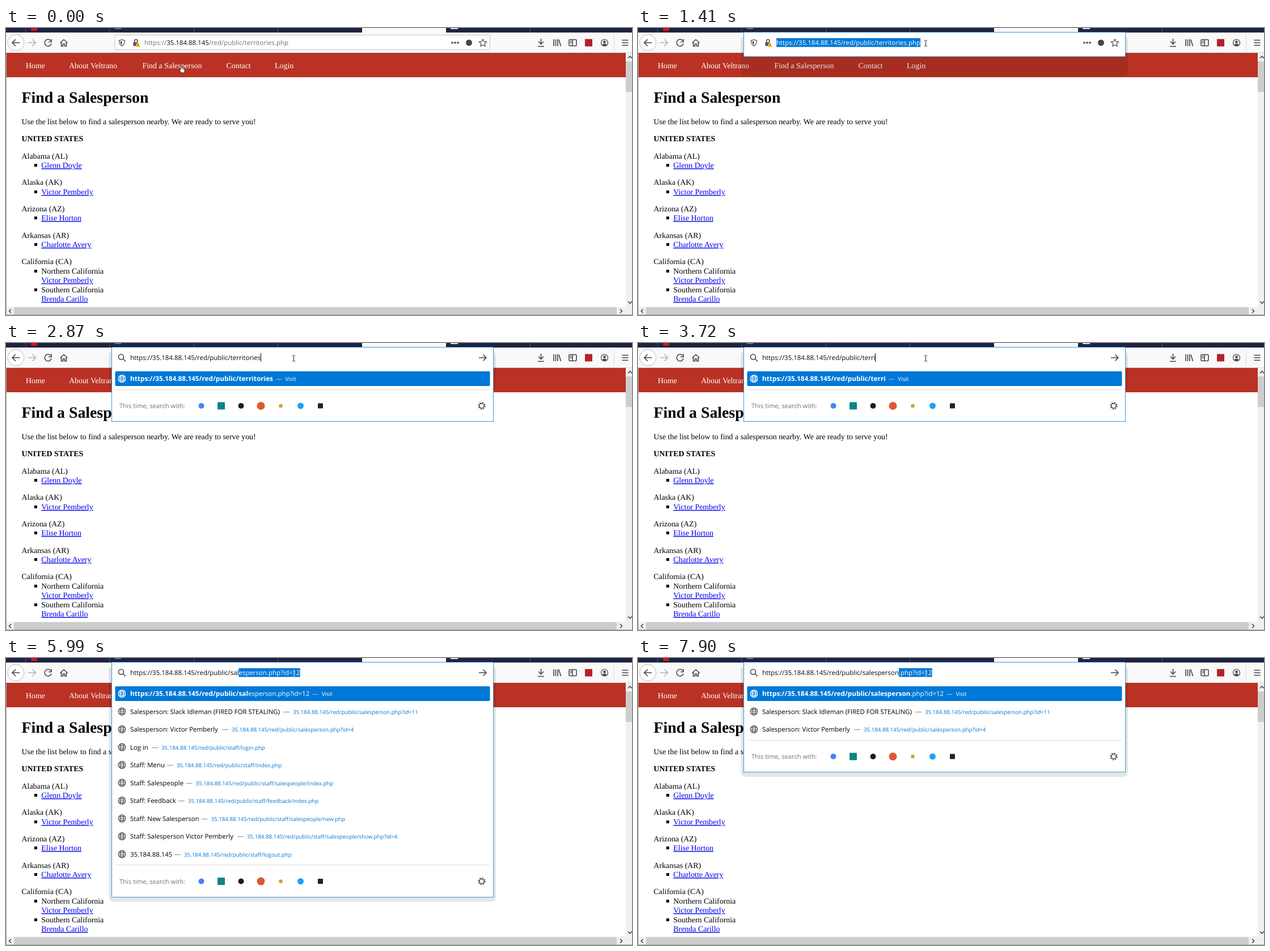
Write an HTML page that moves like this. It is 1104 by 507 pixels and loops after 8000 ms.

```html
<!DOCTYPE html>
<html lang="en">
<head>
<meta charset="utf-8">
<title>Find a Salesperson</title>
<style>
  html, body { margin: 0; width: 100%; height: 100%; overflow: hidden; background: #fff; }
  svg { display: block; width: 100%; height: 100%; }
  text { white-space: pre; text-rendering: geometricPrecision; }
  .page { font: 13.9px "Liberation Serif", serif; }
  .ui { font: 11.47px "Open Sans", sans-serif; }
  .title { font-size: 11.4px; }
  .hint { font-size: 11.2px; fill: #737377; }
  .url { font-size: 9.72px; fill: #0a78d4; }
  .bold { font-weight: 700; font-size: 11.78px; }
  .link { fill: #00e; text-decoration: underline; }
  .icon { fill: none; stroke: #45454a; stroke-width: 1.6; }
  .thin { stroke-width: 1.2; }
</style>
</head>
<body>
<svg viewBox="0 0 1104 507">
  <defs>
    <linearGradient id="fade"><stop stop-color="#fff" stop-opacity="0"/><stop offset="1" stop-color="#fff"/></linearGradient>
    <g id="globe" fill="none" stroke-width="1.2">
      <circle r="6.3"/><ellipse rx="2.8" ry="6.3"/><path d="M-6.3 0H6.3M-5.4-3.2H5.4M-5.4 3.2H5.4"/>
    </g>
    <g id="site">
      <path class="icon thin" d="M204.5 20.5c2 1 3.5 1.3 5 1.3 0 5-1 8-5 10-4-2-5-5-5-10 1.5 0 3-.3 5-1.3z"/>
      <path fill="#45454a" d="M204.5 23v6.500c-2-1.300-2.600-3-2.700-5.800z"/>
      <path class="icon" d="M226.500 25v-2a2.700 2.700 0 0 1 5.400 0v2"/>
      <rect x="224.500" y="25" width="9" height="7" rx="1" fill="#55555a"/>
      <path d="M232.500 25l5 8.500h-10z" fill="#ffbf00" stroke="#fff" stroke-width=".6"/>
      <path d="M232.500 28v2.500m0 .8v1" stroke="#5a4300"/>
      <g fill="#45454a"><circle cx="787" cy="26" r="1.800"/><circle cx="792" cy="26" r="1.800"/><circle cx="797" cy="26" r="1.800"/>
        <circle cx="816.500" cy="26" r="5.500"/></g>
      <path class="icon thin" stroke-linejoin="round" d="M841 19.500l2 4.400 4.800.5-3.600 3.200 1 4.700-4.200-2.400-4.200 2.400 1-4.700-3.600-3.200 4.800-.5z"/>
    </g>
    <path id="hand" fill="#fff" stroke="#222" stroke-width=".9" stroke-linejoin="round"
      d="M-2.500 1.500V-4.500q1-1.500 2 0V-1q3-.3 5 1.500V4L3.500 6.500H-1.500L-4.500 2.500q0-1.500 2-1z"/>
    <path id="arrow" fill="#fff" stroke="#222" stroke-width=".9" d="M-3-6V5l2.500-2.300L1 6l1.700-.8L1.200 2H4.500z"/>
    <path id="beam" fill="none" stroke-width="1" d="M-2.500-5h2m1 0h2M0-4.500V4.500M-2.500 5h2m1 0h2"/>
  </defs>

  <rect width="1104" height="507" fill="#fff"/>
  <!-- tab strip and toolbar -->
  <rect width="1104" height="8" fill="#1f2342"/>
  <path d="M34.500 0v8M182.500 0v8M331.500 0v8M479.500 0v8M924.500 0v8" stroke="#4a4e69"/>
  <rect x="44" width="11" height="5" rx="2" fill="#e0101a"/>
  <rect x="192" width="11" height="2" fill="#60758c"/>
  <rect x="784" width="13" height="2" fill="#ddd"/>
  <rect y="8" width="1104" height="35" fill="#f9f9fa"/>
  <rect x="628" width="148" height="9" fill="#f9f9fa"/>
  <path d="M0 43.500H1104" stroke="#d8d8da"/>
  <circle cx="17.500" cy="26" r="14.500" fill="#fff" stroke="#b8b8bc"/>
  <g class="icon">
    <path d="M24.500 26H11m6-6l-6 6 6 6"/>
    <path d="M39 26h13.500m-6-6l6 6-6 6" stroke="#b4b4b8"/>
    <path d="M79 22.500a6 6 0 1 0 1 5M80 19.500v5h-5"/>
    <path d="M95.500 26.500l6.500-6 6.500 6M97.500 25.500V32h3v-4h3v4h3v-6.500"/>
    <path d="M943.500 19v9.500m-4.500-4.500l4.500 4.500L948 24M938 32.500h11"/>
    <path d="M966 20v12M969.500 20v12M973 20v12M975 20.500l3.500 11.500"/>
    <rect x="993" y="20.500" width="13" height="11" rx="1.500"/><path d="M999 20.500v11M995 23.500h2.500M995 26h2.500"/>
    <circle cx="1055.500" cy="26" r="6" class="thin"/>
    <path d="M1086.500 21.500h11M1086.500 26h11M1086.500 30.500h11"/>
  </g>
  <g fill="#45454a"><circle cx="1055.500" cy="24.500" r="2.300"/><path d="M1051.500 29.500q4-4 8 0-4 4-8 0z"/></g>
  <rect x="1021" y="19.500" width="13" height="13" fill="#b5202b"/>
  <path d="M1072.500 12v28" stroke="#dcdce0"/>
  <rect x="192" y="12.500" width="661.500" height="26" rx="2" fill="#fff" stroke="#c4c4c8"/>
  <use href="#site"/>
  <text class="ui" x="244" y="30" fill="#737377">https://<tspan fill="#0c0c0d">35.184.88.145</tspan>/red/public/territories.php</text>

  <!-- page -->
  <rect x="1" y="44" width="1092" height="43" fill="#ba3224"/>
  <g class="page" id="page">
    <text x="27.500" y="132" font-size="27.800" font-weight="700">Find a Salesperson</text>
    <text x="27.500" y="170">Use the list below to find a salesperson nearby. We are ready to serve you!</text>
    <text x="27.500" y="200" font-weight="700">UNITED STATES</text>
  </g>
  <!-- scroll bars -->
  <path fill="#f0f0f0" d="M1093 44h11v463H0V492.500h1093z"/>
  <path fill="#cdcdcd" d="M1093 59h11v54h-11zM14 493h1063v13H14z"/>
  <path class="icon" d="M1097 53.500l3.500-3.500 3.500 3.500M1097 483l3.500 3.500 3.500-3.500M9 496.500L5.500 500 9 503.500M1083 496.500l3.500 3.500-3.500 3.500"/>
  <path fill="none" stroke="#a9a9a9" d="M.5 44V506.500H1104"/>

  <g class="ui" id="panel"></g>
  <use id="cursor" href="#hand"/>
</svg>

<script>
const $ = id => document.getElementById(id);
const text = (x, y, str, attrs = '') => `<text x="${x}" y="${Math.round(y)}" ${attrs}>${str}</text>`;
const rect = (x, y, w, h, fill, r = 0) =>
  `<rect x="${x}" y="${y}" width="${w}" height="${h}" rx="${r}" fill="${fill}"/>`;
const dot = (x, y, fill, r = 6) => `<circle cx="${x}" cy="${y}" r="${r}" fill="${fill}"/>`;
const square = (x, y, fill, s = 13) => rect(x - s / 2, y - s / 2, s, s, fill, 1);

// ---- page text ----
const nav = [[35, 'Home'], [111, 'About Veltrano'], [240.5, 'Find a Salesperson'], [388.5, 'Contact'], [474, 'Login']];
const states = [
  ['Alabama (AL)', '*Glenn Doyle'], ['Alaska (AK)', '*Victor Pemberly'],
  ['Arizona (AZ)', '*Elise Horton'], ['Arkansas (AR)', '*Charlotte Avery'],
  ['California (CA)', 'Northern California', '*Victor Pemberly', 'Southern California', '*Brenda Carillo']
];
let page = nav.map(([x, label]) => text(x, 71, label, 'fill="#fff"')).join('');
states.forEach(([name, ...lines], i) => {
  const top = 230.5 + 46.7 * i;
  page += text(27.5, top, name);
  lines.forEach((line, j) => {
    const y = top + 16.4 * (j + 1), link = line[0] === '*';
    page += text(62.3, y, line.replace('*', ''), link ? 'class="link"' : '');
    if (j % 2 === 0) page += rect(50, Math.round(y) - 7, 5, 5, '#000');
  });
});
$('page').insertAdjacentHTML('beforeend', page);

// ---- suggestion rows: title, x of address, address, icon ----
const host = '35.184.88.145/red/public/';
const base = 'https://' + host;
const topSites = [
  ['Search with Velmora.com', 0, '', dot, '#1c1c1c'],
  ['Pagehood - Log In or Sign Up', 396, 'pagehood.com', square, '#3b5998'],
  ['Vidoona', 287, 'vidoona.com', square, '#f00'],
  ['lmportal.elmu', 319.5, 'lmportal.elmu.edu', square, '#111'],
  ['ENGR 276 Grades-Spring 2020 - Mondra Sheets', 492, 'docs.google.com/spreadsheets/d/17kD44Y7eTRA8FcB7aomfpLC3wBRbPk6Qwg', square, '#0f9d58'],
  ['Inbox - marisolandri.westdoe@letteo.com - Letteo', 507.5, 'mail.google.com/mail/u/0/#inbox', square, '#d54b3d'],
  ['Jobgrove: Log In or Sign Up', 385, 'jobgrove.com', square, '#0a70b0'],
  ['Lab: Unit 1 - Infodefense Institution | Trailbound Courses', 543, 'courses.codepath.com/courses/cybersecurity_university/unit/1#!exe', dot, '#111']
];
const entry = (title, x, path) => [title, x, host + path];
const fired = entry('Salesperson: Slack Idleman (FIRED FOR STEALING)', 506, 'salesperson.php?id=11');
const seller = entry('Salesperson: Victor Pemberly', 398, 'salesperson.php?id=4');
const staff = [
  entry('Log in', 274, 'staff/login.php'),
  entry('Staff: Menu', 301, 'staff/index.php'),
  entry('Staff: Salespeople', 334.5, 'staff/salespeople/index.php')
];
const feedback = entry('Staff: Feedback', 321, 'staff/feedback/index.php');
const folderRows = [
  entry('35.184.88.145', 314, 'salesperson.php?id=12'), fired, seller, ...staff,
  entry('Contact Us', 298.5, 'contact.php'), entry('Veltrano', 285.5, 'index.php'), feedback
];
const matchRows = [
  fired, seller, ...staff, feedback,
  entry('Staff: New Salesperson', 361.5, 'staff/salespeople/new.php'),
  entry('Staff: Salesperson Victor Pemberly', 425, 'staff/salespeople/show.php?id=4'),
  entry('35.184.88.145', 314, 'staff/logout.php')
];
const finalRows = [fired, seller];

// ---- timeline ----
const url = base + 'territories.php';
const steps = [
  { at: 0 },
  { at: 1410, keep: '', sel: url, rows: [] },
  { at: 1540, keep: '', sel: url, rows: topSites },
  { at: 1820, keep: url.slice(0, -3), sel: 'php', rows: topSites }
];
[2720, 2860, 3000, 3150, 3290, 3430, 3580, 3720, 3870, 4000, 4300, 4450].forEach((at, i) =>
  steps.push({ at, keep: base + 'territories.'.slice(0, 12 - i), typing: true, rows: i ? [] : topSites, stale: !i }));
steps.push({ at: 4600, keep: base, typing: true, rows: folderRows });
steps.push({ at: 5070, keep: base, typing: true, rows: folderRows, noCaret: true });
const fill = 'salesperson.php?id=12';
[[5540, 1, folderRows], [5690, 1, matchRows], [5840, 2, matchRows], [5990, 3, matchRows], [6120, 3, finalRows],
 [6550, 5, finalRows], [6850, 6, finalRows], [7010, 7, finalRows], [7310, 8, finalRows], [7460, 9, finalRows],
 [7620, 10, finalRows], [7900, 11, finalRows]].forEach(([at, n, rows]) =>
  steps.push({ at, keep: base + fill.slice(0, n), sel: fill.slice(n), typing: true, rows }));

// ---- drawing ----
const pen = document.createElement('canvas').getContext('2d');
pen.font = '11.47px "Open Sans", sans-serif';
const widthOf = str => pen.measureText(str).width;
const globe = (y, color) => `<use href="#globe" x="204.5" y="${y}" stroke="${color}"/>`;

function drawRow([title, x, address, icon, color], y) {
  let out = icon ? icon(204.5, y, color) : globe(y, '#55555a');
  out += text(219, y + 4, title, 'class="title"');
  if (address) out += `<path d="M${x - 17} ${Math.round(y) + .5}h11" stroke="#8a8a8e"/>` + text(x, y + 4, address, 'class="url"');
  return out;
}

function drawVisit({ keep, sel = '' }) {
  return rect(192.5, 50, 661, 26, '#0078d7', 2) + globe(63, '#fff') +
    text(219, 67, `<tspan class="bold">${keep}</tspan>${sel}<tspan dx="5" font-size="10.5" fill="#b9daf5">—</tspan>` +
      `<tspan dx="6" font-size="9.8">Visit</tspan>`, 'fill="#fff"');
}

function drawEngines(n) {
  const y = 79.5 + 31.5 * n, line = Math.round(50 + 31.5 * n) + .5;
  const marks = [[dot, '#4285f4', 5], [square, '#0f8484', 13], [dot, '#1c1c1c', 5], [dot, '#de5833', 7],
    [square, '#c9a227', 6], [dot, '#1da1f2', 5.5], [square, '#222', 9]];
  return `<path d="M193 ${line}H853" stroke="#dcdce0"/>` +
    text(200, y + 4, 'This time, search with:', 'class="hint"') +
    marks.map(([shape, color, size], i) => shape(344.5 + 35 * i, y, color, size)).join('') +
    `<circle class="icon" cx="839" cy="${y}" r="4.2"/>` +
    `<circle class="icon" cx="839" cy="${y}" r="6" stroke-dasharray="2 2.71"/>`;
}

function drawPanel(step) {
  const { keep, sel = '', typing, rows, stale, noCaret } = step;
  if (!rows) return '';
  const n = rows.length + (typing && !stale ? 1 : 0);
  const bottom = 50.5 + 31.5 * n + (typing ? 57 : 0);
  const shadow = n > 1 ? bottom + 8 : 85;
  let out = rect(181.5, 14, 682.5, shadow - 14, 'rgba(0,0,0,.1)', 8);
  out += `<rect x="186.5" y="7.5" width="673" height="${Math.round(bottom) - 8}" fill="#fff" stroke="#3a96d8"/>`;
  out += typing
    ? '<g class="icon"><circle cx="203" cy="24.5" r="4.5"/><path d="M206.5 28l4.5 4.5M834 26h13m-5.5-5.5L847 26l-5.5 5.5"/></g>'
    : '<use href="#site"/>';

  const left = typing ? 219 : 244;
  const end = left + widthOf(keep);
  if (sel) out += rect(end, 18, widthOf(sel), 15.5, '#0078d7');
  out += text(left, 30, `${keep}<tspan fill="#fff">${sel}</tspan>`, 'fill="#0c0c0d"');
  if (typing && !sel && !noCaret) out += rect(Math.round(end), 18, 1, 15, '#000');

  if (typing && !stale) out += drawVisit(step);
  rows.forEach((row, i) => { out += drawRow(row, 63 + 31.5 * (i + n - rows.length)); });
  if (n > 1) {
    const h = 31.5 * (n - 1);
    out += rect(822, 80, 30, h, 'url(#fade)') + rect(852, 80, 7, h, '#fff');
  }
  if (typing) out += drawEngines(n);
  return out;
}

function placeCursor(t, step) {
  const k = [130, 270, 410, 540, 680, 820].filter(at => t >= at).length / 6;
  const e = k * k * (3 - 2 * k);
  const x = 310.5 + 197 * e, y = 72.5 - 45.5 * e;
  const shape = y < 40 ? 'beam' : y > 44 && x < 367 ? 'hand' : 'arrow';
  const cursor = $('cursor');
  cursor.setAttribute('href', '#' + shape);
  cursor.setAttribute('x', x);
  cursor.setAttribute('y', y);
  cursor.setAttribute('stroke', step.typing && step.sel ? '#8cc4f0' : '#222');
}

const start = performance.now();
let shown;
function frame() {
  const t = (performance.now() - start) % 8000;
  const step = steps.findLast(s => t >= s.at);
  if (step !== shown) $('panel').innerHTML = drawPanel(shown = step);
  placeCursor(t, step);
  requestAnimationFrame(frame);
}
frame();
</script>
</body>
</html>
```
